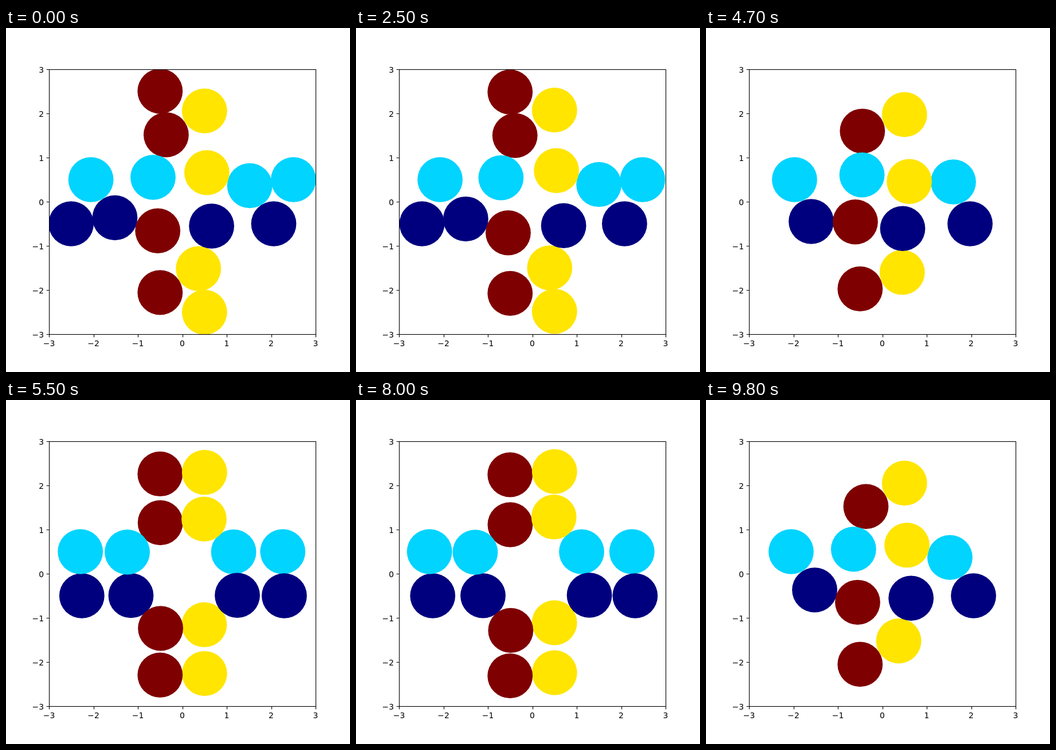
Write an HTML page with a canvas that moves like this. It is 600 px wide and 600 px high and loops after 9900 ms.

```html
<!DOCTYPE html>
<html>
<head>
<meta charset="utf-8">
<style>
html, body { margin: 0; width: 100%; height: 100%; overflow: hidden; background: #fff; }
canvas { display: block; }
</style>
</head>
<body>
<canvas id="stage" width="600" height="600"></canvas>
<script>
const ctx = document.getElementById('stage').getContext('2d');
const STEP = 100, STEPS = 99;
const PERIOD = 24.53; // steps between two discs entering a lane
const HALF = 42.31;   // steps from entering to the middle of the crossing
const LEFT = 75, RIGHT = 540, TOP = 72, BOTTOM = 534;
const LANES = ['#00d4ff', '#7f0000', '#00007f', '#ffe500']; // quarter turns, counter-clockwise

const px = x => LEFT + (x + 3) * (RIGHT - LEFT) / 6;
const py = y => BOTTOM - (y + 3) * (BOTTOM - TOP) / 6;

// Position in a lane, s steps away from the middle: fast inside, slow outside,
// pushed along by the next disc in the queue
const pace = s => Math.min(.0976 * s, .806 + .04 * s);
const along = s => Math.max(pace(s), pace(s - PERIOD) + .985);

// Bulge around the middle, and a dip where lanes squeeze past each other
const across = s => .5 + .207 * Math.exp(-((s / 5.8) ** 2))
  - .138 * Math.exp(-Math.abs(s - 17.8) / 2.1);

function drawDiscs(step) {
  ctx.save();
  ctx.beginPath();
  ctx.rect(LEFT, TOP, RIGHT - LEFT + 1, BOTTOM - TOP + 1);
  ctx.clip();
  for (let age = step % PERIOD; age <= 2 * HALF; age += PERIOD) {
    const s = Math.abs(age - HALF);
    let x = Math.sign(HALF - age) * along(s);
    let y = across(s);
    for (const color of LANES) {
      ctx.fillStyle = color;
      ctx.beginPath();
      ctx.ellipse(px(x), py(y), 39.4, 39.2, 0, 0, 2 * Math.PI);
      ctx.fill();
      [x, y] = [-y, x];
    }
  }
  ctx.restore();
}

function drawAxes() {
  ctx.strokeStyle = ctx.fillStyle = '#000';
  ctx.lineWidth = 1.1;
  ctx.font = '13.89px "DejaVu Sans", sans-serif';
  ctx.strokeRect(LEFT + .5, TOP + .5, RIGHT - LEFT, BOTTOM - TOP);
  ctx.beginPath();
  for (let n = -3; n <= 3; n++) {
    const label = String(n).replace('-', '\u2212');
    const x = Math.round(px(n)) + .5, y = Math.round(py(n)) + .5;
    ctx.moveTo(x, BOTTOM + .5);
    ctx.lineTo(x, BOTTOM + 5.4);
    ctx.moveTo(LEFT + .5, y);
    ctx.lineTo(LEFT - 4.4, y);
    ctx.textAlign = 'center';
    ctx.fillText(label, px(n), 555);
    ctx.textAlign = 'right';
    ctx.fillText(label, LEFT - 9, py(n) + 6);
  }
  ctx.stroke();
}

function draw() {
  ctx.fillStyle = '#fff';
  ctx.fillRect(0, 0, 600, 600);
  drawDiscs(Math.floor(performance.now() / STEP) % STEPS);
  drawAxes();
  requestAnimationFrame(draw);
}
draw();
</script>
</body>
</html>
```
